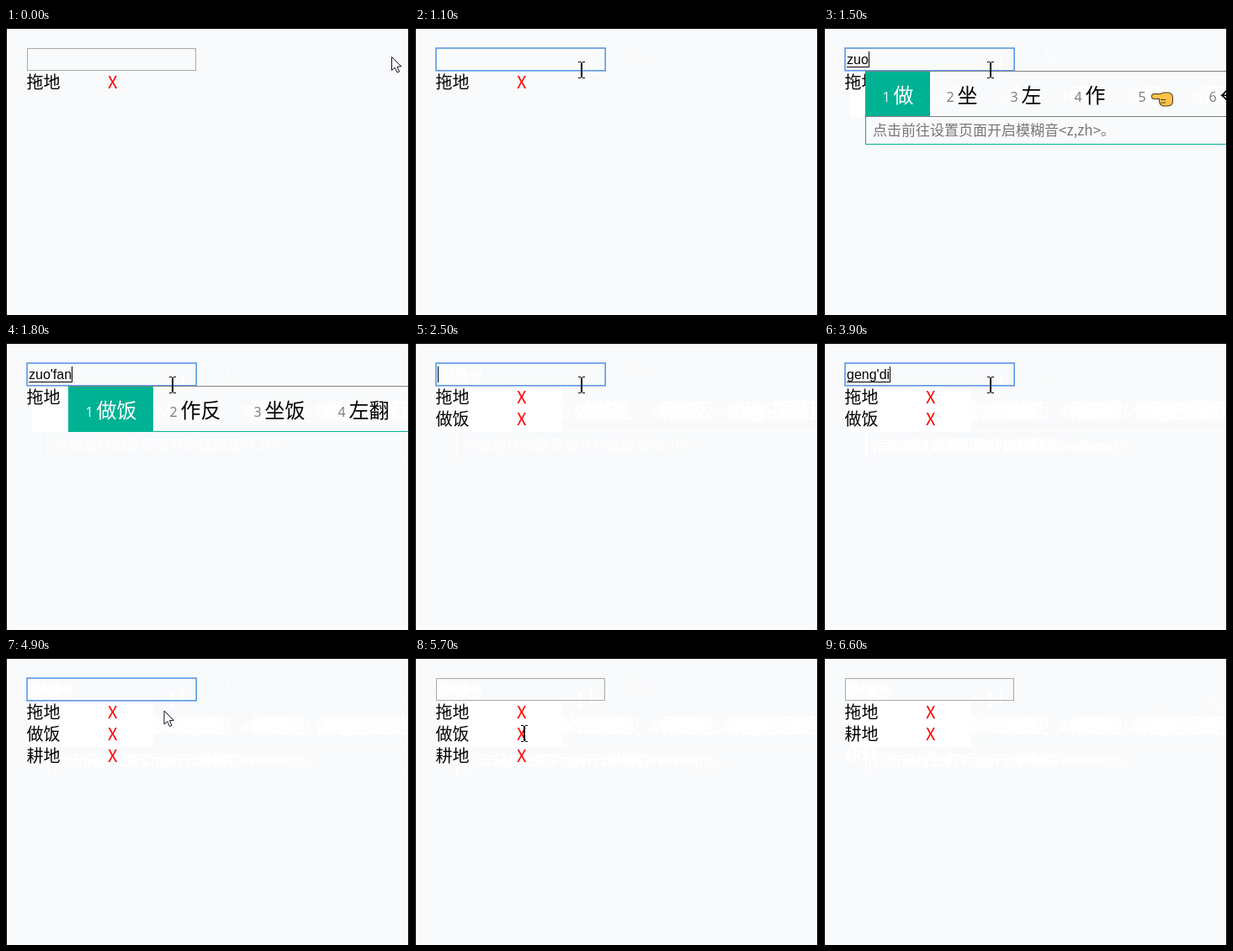
An HTML page with a canvas for the animation above (7400 ms loop, 479 by 342 pixels).

```html
<!DOCTYPE html>
<html lang="zh-CN">
<head>
<meta charset="utf-8">
<title>Todo list</title>
<style>
  html, body { margin: 0; width: 100%; height: 100%; overflow: hidden; background: #f8fafc; }
  canvas { display: block; }
</style>
</head>
<body>
<canvas id="stage" width="479" height="342"></canvas>
<script>
const ctx = document.getElementById('stage').getContext('2d');
const W = 479, H = 342, LOOP = 7400;
const PAGE = '#f8fafc', GREEN = '#00b294', GREY = '#808080';
const CJK = '"Noto Sans CJK SC", "Noto Sans CJK JP", sans-serif';
const INPUT_FONT = '16px "Liberation Sans", ' + CJK;
const HAND = '👈';
const hint = pair => `点击前往设置页面开启模糊音<${pair}>。`;

// Each step changes part of the previous state.
const compose = (text, options, note = '') => ({ text, options: options.split(' '), note, caret: true });
const commit = text => ({ text, options: null });
const arrow = (x, y) => ({ pointer: { x, y, beam: false } });
const beam = (x, y) => ({ pointer: { x, y, beam: true } });

const steps = [
  [0, { items: ['拖地'], text: '', options: null, note: '', focus: false, caret: false, ...arrow(458.5, 34.5) }],
  [100, arrow(452, 34)],
  [200, arrow(425, 31)],
  [300, arrow(340, 27)],
  [400, arrow(263.5, 24.5)],
  [500, beam(210, 46)],
  [600, beam(198, 50)],
  [700, { focus: true, caret: true }],
  [1100, { caret: false }],
  [1300, compose('z', '在 这 中 再 做 最')],
  [1400, compose('zu', '组 足 族 租 祖 阻')],
  [1500, compose('zuo', `做 坐 左 作 ${HAND} ←`, hint('z,zh'))],
  [1600, compose("zuo'f", '做饭 做法 作废 作法 做房')],
  [1700, compose("zuo'fa", '做法 作法 做饭 作罚 坐法')],
  [1800, compose("zuo'fan", '做饭 作反 坐饭 左翻 做翻')],
  [1900, commit('做饭')],
  [2400, { text: '', items: ['拖地', '做饭'], caret: false }],
  [2500, { caret: true }],
  [3000, compose('g', '个 过 国 给 刚 高')],
  [3100, compose('gen', '跟 根 亘 艮 哏 茛', hint('en,eng'))],
  [3200, compose('geng', '更 耿 庚 耕 梗 羹', hint('en,eng'))],
  [3400, compose("geng'd", '更多 更大 更得 更低 耕地')],
  [3500, compose("geng'di", '耕地 更低 梗地 更地 庚帝')],
  [3900, { options: null }],
  [4000, commit('耕地')],
  [4300, { text: '', items: ['拖地', '做饭', '耕地'] }],
  [4800, { caret: false, ...beam(196, 49) }],
  [4900, arrow(188, 63)],
  [5000, arrow(179, 75)],
  [5100, arrow(164, 83)],
  [5200, arrow(152, 86)],
  [5300, { caret: true, ...beam(134, 90) }],
  [5400, beam(131, 91)],
  [5500, beam(130, 90)],
  [5700, { focus: false, caret: false }],
  [5800, { items: ['拖地', '耕地'] }],
  [5900, beam(132, 94)],
  [6000, arrow(138, 92)],
  [6100, arrow(164, 82)],
  [6200, arrow(270, 76)],
  [6300, arrow(370, 67)],
  [6400, arrow(397.5, 62)],
  [6500, arrow(464.5, 46)],
  [6600, { pointer: null }],
];
const states = [];
steps.forEach(([time, change], i) => states.push({ ...states[i - 1], ...change, time }));

let ghost = false;
const ink = color => ghost ? '#fff' : color;

function box(x, y, w, h, color) {
  ctx.fillStyle = ink(color);
  ctx.fillRect(x, y, w, h);
}

function label(text, x, y, font, color) {
  ctx.font = font;
  ctx.fillStyle = ink(color);
  ctx.fillText(text, x, y);
}

function polygon(points, fill, stroke) {
  ctx.beginPath();
  points.forEach(([x, y]) => ctx.lineTo(x, y));
  ctx.closePath();
  ctx.fillStyle = fill;
  ctx.strokeStyle = ink(stroke);
  ctx.lineWidth = 1;
  if (!ghost) ctx.fill();
  ctx.stroke();
}

function textEnd(text) {
  ctx.font = INPUT_FONT;
  return 27 + Math.round(ctx.measureText(text).width);
}

function drawInput({ text, focus, caret }) {
  if (!ghost) {
    ctx.lineWidth = focus ? 1.6 : 1;
    ctx.strokeStyle = focus ? '#5b97e5' : '#a9a9a9';
    if (focus) ctx.strokeRect(25, 24, 201.2, 26.8);
    else ctx.strokeRect(25.5, 24.5, 200, 26);
  }
  const end = textEnd(text);
  label(text, 27, 43, INPUT_FONT, '#000');
  if (/[a-z]/.test(text)) box(27, 46, end - 27, 1, '#000');
  if (caret) box(text ? end : 27, 28, 1, 19, '#000');
}

function drawItems({ items }, panel) {
  ctx.save();
  if (panel) {
    ctx.beginPath();
    ctx.rect(0, 0, W, panel.top);
    ctx.rect(0, panel.top, panel.x, panel.height);
    ctx.rect(0, panel.top + panel.height, W, H);
    ctx.clip();
  }
  items.forEach((item, row) => {
    const y = 72 + row * 26;
    label(item, 24.5, y, '20px ' + CJK, '#000');
    label('X', 121, y, '20px ' + CJK, '#f00');
  });
  ctx.restore();
}

function drawHand(x) {
  ctx.beginPath();
  ctx.roundRect(x, 79, 17, 5, 2.5);
  ctx.roundRect(x + 9, 77.5, 15, 15, 5);
  ctx.strokeStyle = ink('#4a3a20');
  ctx.lineWidth = 2;
  ctx.stroke();
  ctx.fillStyle = ink('#ffc247');
  ctx.fill();
  for (const y of [85, 88.5]) box(x + 10, y, 6, 1, '#4a3a20');
}

function drawPanel({ options, note }, { x, top, height }) {
  let left = x;
  options.forEach((option, i) => {
    const chosen = i === 0, isHand = option === HAND;
    const width = 52 + (isHand ? 32 : 24 * option.length);
    if (chosen) box(left, top + 1, width + 1, 54, GREEN);
    label(i + 1, left + 20.5, 88, '16px "Noto Sans", sans-serif', chosen ? '#e0f5f1' : GREY);
    if (isHand) drawHand(left + 37);
    else label(option, left + 33.5, 89, '24px ' + CJK, chosen ? '#fff' : '#000');
    left += width;
  });
  box(x, top, W - x, 1, GREY);
  box(x, top, 1, height, GREEN);
  box(x, top + height - 1, W - x, 1, GREEN);
  if (note) {
    box(x, 105, W - x, 1, GREY);
    label(note, x + 9, 128, '17px ' + CJK, '#777');
  }
}

function drawPointer({ x, y, beam }) {
  if (beam) {
    box(x - 1, y - 8, 2, 17, '#000');
    for (const edge of [y - 10, y + 9]) {
      box(x - 4, edge, 3, 1, '#000');
      box(x + 1, edge, 3, 1, '#000');
    }
    box(x - 1, y - 9, 2, 1, '#000');
    box(x - 1, y + 8, 2, 1, '#000');
  } else {
    const outline = [[0, 0], [0, 16], [3.7, 12.6], [6.5, 18.5], [9, 17.5], [6.5, 11.6], [11.3, 11.3]];
    polygon(outline.map(([dx, dy]) => [x + dx, y + dy]), '#fff', '#101020');
  }
}

function drawState(state) {
  const panel = state.options &&
    { x: textEnd(state.text) - 4, top: 51, height: state.note ? 88 : 55 };
  drawInput(state);
  drawItems(state, panel);
  if (panel) drawPanel(state, panel);
  if (state.pointer && !(ghost && state.time < 400)) drawPointer(state.pointer);
}

function render(index) {
  ctx.fillStyle = PAGE;
  ctx.fillRect(0, 0, W, H);
  // Everything that was shown before leaves a faint white trail.
  ghost = true;
  states.slice(0, index).forEach(drawState);
  ghost = false;
  drawState(states[index]);
  box(0, 0, W, 1, '#000');
  box(0, 0, 1, H, '#000');
  box(W - 1, 0, 1, H, '#000');
}

let shown = -1;
function tick() {
  const time = performance.now() % LOOP;
  const index = states.findLastIndex(state => state.time <= time);
  if (index !== shown) render(shown = index);
  requestAnimationFrame(tick);
}
tick();
</script>
</body>
</html>
```
